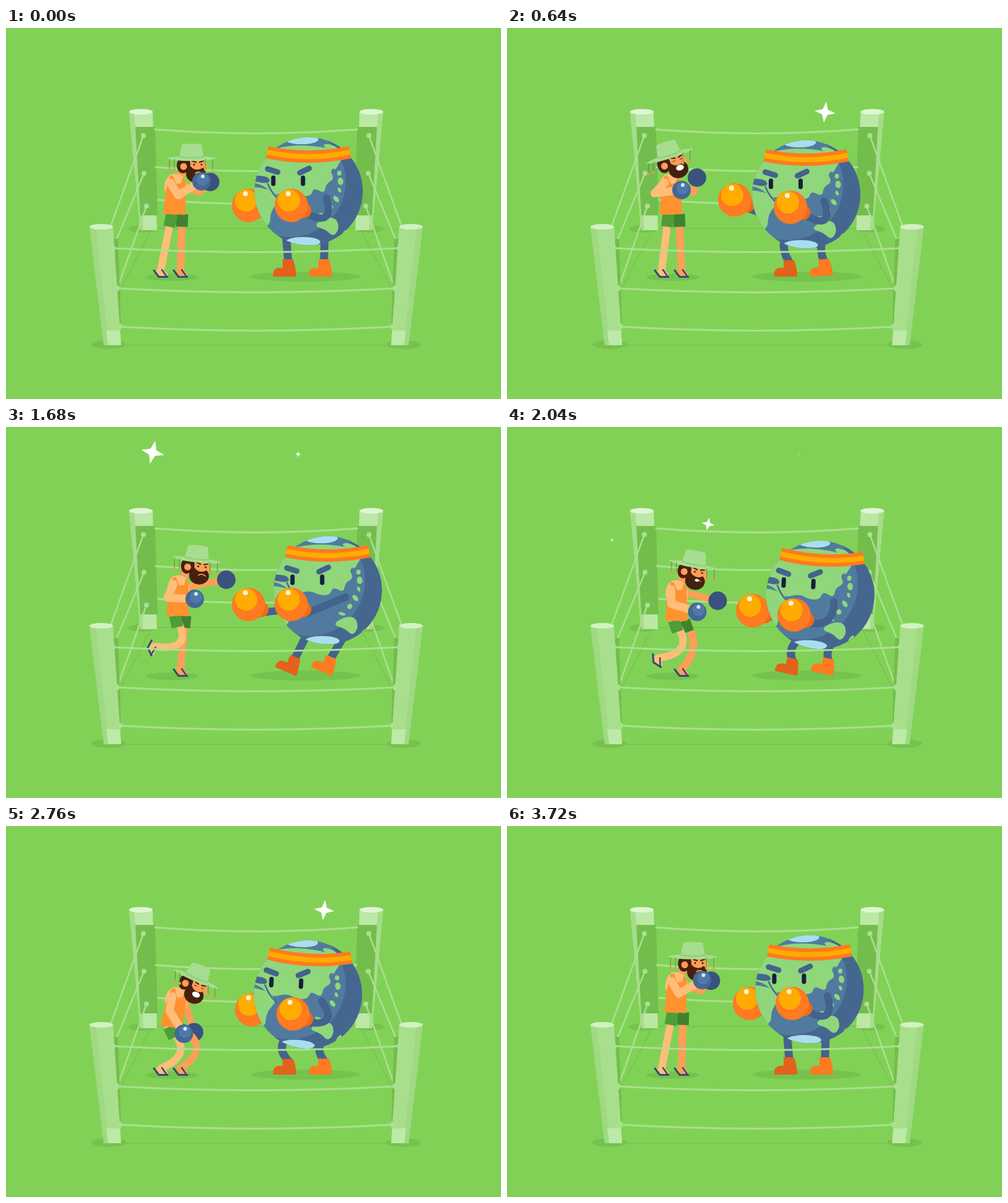
Animation, 800 px wide and 600 px high, one loop 3.76 s. Source, as an HTML page with a canvas:

```html
<!DOCTYPE html>
<html lang="en">
<head>
<meta charset="utf-8">
<title>Boxing match</title>
<style>
html, body { margin: 0; width: 100%; height: 100%; overflow: hidden; background: #82d157; }
canvas { display: block; width: 800px; height: 600px; }
</style>
</head>
<body>
<canvas id="stage" width="800" height="600"></canvas>
<script>
const ctx = document.getElementById('stage').getContext('2d');
const LOOP = 3760;
const TAU = Math.PI * 2;

// ---------- drawing helpers ----------
function ellipse(x, y, rx, ry, color, angle = 0) {
  ctx.fillStyle = color;
  ctx.beginPath();
  ctx.ellipse(x, y, rx, ry, angle, 0, TAU);
  ctx.fill();
}
const disc = (x, y, r, color) => ellipse(x, y, r, r, color);

function poly(points, color) {
  ctx.fillStyle = color;
  ctx.beginPath();
  points.forEach(p => ctx.lineTo(...p));
  ctx.fill();
}

// band between two edges, each given as [left, right, y]
function band([l1, r1, y1], [l2, r2, y2], color) {
  poly([[l1, y1], [r1, y1], [r2, y2], [l2, y2]], color);
}

// closed smooth shape guided by its corner points
function blob(points, color) {
  const mid = (a, b) => [(a[0] + b[0]) / 2, (a[1] + b[1]) / 2];
  ctx.fillStyle = color;
  ctx.beginPath();
  ctx.moveTo(...mid(points.at(-1), points[0]));
  points.forEach((p, i) => ctx.quadraticCurveTo(...p, ...mid(p, points[(i + 1) % points.length])));
  ctx.fill();
}

function line(points, width, color, cap = 'round') {
  ctx.strokeStyle = color;
  ctx.lineWidth = width;
  ctx.lineCap = cap;
  ctx.lineJoin = 'round';
  ctx.beginPath();
  points.forEach(p => ctx.lineTo(...p));
  ctx.stroke();
}

function curve(a, c, b, width, color, cap = 'round') {
  ctx.strokeStyle = color;
  ctx.lineWidth = width;
  ctx.lineCap = cap;
  ctx.beginPath();
  ctx.moveTo(...a);
  ctx.quadraticCurveTo(...c, ...b);
  ctx.stroke();
}

// curve that passes through its joint
const limb = (a, j, b, width, color) =>
  curve(a, [2 * j[0] - (a[0] + b[0]) / 2, 2 * j[1] - (a[1] + b[1]) / 2], b, width, color);

// elbow or knee of a two-bone limb; side picks the way it bends
function joint(a, b, upper, lower, side) {
  const dx = b[0] - a[0], dy = b[1] - a[1], d = Math.hypot(dx, dy);
  const along = d > upper + lower ? d * upper / (upper + lower)
    : (upper * upper - lower * lower + d * d) / (2 * d);
  const out = side * Math.sqrt(Math.max(0, upper * upper - along * along)) * (d < upper + lower);
  return [a[0] + (dx * along - dy * out) / d, a[1] + (dy * along + dx * out) / d];
}

function at(x, y, angle, draw) {
  ctx.save();
  ctx.translate(x, y);
  ctx.rotate(angle);
  draw();
  ctx.restore();
}

function bothSides(draw) {
  draw();
  ctx.save();
  ctx.translate(808.5, 0);
  ctx.scale(-1, 1);
  draw();
  ctx.restore();
}

const add = (p, x, y) => [p[0] + x, p[1] + y];

// ---------- motion ----------
const mix = (a, b, u) => {
  if (typeof a === 'number') return a + (b - a) * u;
  if (Array.isArray(a)) return a.map((v, i) => mix(v, b[i], u));
  return Object.fromEntries(Object.keys(a).map(k => [k, mix(a[k], b[k], u)]));
};

const BEATS = [0, 640, 1080, 1680, 2400, 3120, LOOP];

function poseAt(poses, t) {
  const i = BEATS.findIndex(beat => beat > t) - 1;
  const u = (t - BEATS[i]) / (BEATS[i + 1] - BEATS[i]);
  return mix(poses[i], poses[(i + 1) % poses.length], u * u * (3 - 2 * u));
}

// short recoil of the head when a punch lands
const recoil = t => [570, 1150].reduce((sum, hit) => sum + 7 * Math.exp(-(((t - hit) / 50) ** 2)), 0);

const manGuard = {
  head: [300, 211], nod: 0, hip: [272, 301], lean: .06,
  near: [316, 248], far: [330, 249], foot: [250, 392], kick: 0, pain: 0
};
const manHit = { ...manGuard, head: [264, 207], nod: -.31, hip: [265, 301], lean: 0,
  near: [282, 262], far: [307, 242], pain: 1 };
const manPoses = [
  manGuard,
  manHit,
  { ...manHit, head: [272, 209], nod: -.28, near: [281, 257], far: [318, 236] },
  { ...manGuard, head: [308, 215], nod: .12, hip: [277, 305],
    near: [305, 278], far: [356, 247], foot: [240, 355], kick: 1.15 },
  { ...manGuard, head: [295, 232], nod: .25, hip: [270, 321], lean: 0,
    near: [310, 320], far: [325, 315], pain: 1 },
  { ...manGuard, head: [319, 263], nod: .56, hip: [264, 329], lean: .4,
    near: [265, 352], far: [283, 352], pain: 1 }
];

const earthGuard = { pos: [489, 264], tilt: 0, turn: 0, front: [461, 287], rear: [392, 287] };
const earthPoses = [
  earthGuard,
  { ...earthGuard, pos: [483.5, 269], front: [458, 290], rear: [368, 278] },
  { ...earthGuard, pos: [472.5, 276], turn: -18, front: [345, 265], rear: [388, 271] },
  { ...earthGuard, pos: [520, 264] },
  { ...earthGuard, pos: [492.5, 279], tilt: .1, turn: -6, front: [467, 321], rear: [402, 307] },
  { ...earthGuard, pos: [483.5, 266] }
];

// x, y, size, time of the brightest moment
const stars = [
  [340, 83, 16, 360], [514, 136, 17, 650], [623, 193, 6, 905], [425, 152, 16, 1305],
  [237, 41, 19, 1690], [472, 44, 6, 1790], [325, 157, 16, 2195], [170, 183, 8, 2260],
  [514, 136, 17, 2710], [237, 41, 18, 3140]
];

function drawStars(t) {
  for (const [x, y, size, peak] of stars) {
    const phase = (t - peak) / 570;
    if (Math.abs(phase) >= .5) continue;
    const r = size * Math.cos(Math.PI * phase);
    const points = Array.from({ length: 8 }, (_, i) => {
      const d = i % 2 ? r * .36 : r;
      return [d * Math.sin(i * TAU / 8), -d * Math.cos(i * TAU / 8)];
    });
    at(x, y, (800 - x) / 2500, () => poly(points, '#fff'));
  }
}

// ---------- ring ----------
const ROPE = '#abe08f', SHADE = '#73bd4d', FLOOR = '#75c24e';
const backKnots = [[222, 174], [223, 235], [227, 288]];
const frontKnots = [[173, 356], [180, 421], [184, 483]];

const rope = (x, y) => curve([x, y], [404, y + 13], [808.5 - x, y], 3, ROPE);

function drawBackRing() {
  line([[220, 324], [588, 324]], 1.5, FLOOR);
  line([[165, 513], [643, 513]], 1.5, FLOOR);
  bothSides(() => {
    line([[234, 328], [184, 424], [183, 510]], 1.5, FLOOR);
    ellipse(221, 325, 24, 6, FLOOR);
    ellipse(166, 512, 28, 7, FLOOR);
    band([199, 237, 136], [217, 244, 327], '#bbe8a5');
    band([199, 207, 136], [217, 222, 327], '#a5dc89');
    band([209, 241, 160], [217, 245, 303], SHADE);
    ellipse(218, 135.5, 19, 4.5, '#dff6d2');
  });
  backKnots.forEach(([x, y]) => rope(x + 19, y - 10));
  bothSides(() => backKnots.forEach((knot, i) => {
    line([knot, i ? frontKnots[i - 1] : [170, 318]], 2.5, ROPE);
    disc(...knot, 4, ROPE);
  }));
  ellipse(268, 403, 43, 6, FLOOR);
  ellipse(484, 402, 88, 8, FLOOR);
}

function drawFrontRing() {
  bothSides(() => {
    band([173, 181, 341], [183, 186, 488], SHADE);
    band([135, 173, 322], [158, 186, 512], '#a8df8c');
    band([135, 145, 322], [158, 166, 513], '#9fd982');
    band([162, 184, 489], [165, 186, 513], '#bdeaa8');
    ellipse(154, 321.5, 19, 4.5, '#d3f1c3');
  });
  frontKnots.forEach(knot => rope(...knot));
  bothSides(() => frontKnots.forEach(knot => ellipse(...knot, 3.5, 5, ROPE)));
}

// ---------- globe ----------
const RADIUS = 87.5;
const LIMB = '#43628d', DEEP = '#45678f', LAND = '#90d67b', ICE = '#a9def0';
const ORANGE = '#ff7a20', AMBER = '#ffab00';

function bigGlove([x, y]) {
  disc(x + 20, y + 8, 12.5, '#f06a18');
  disc(x, y, 27, ORANGE);
  disc(x - 4, y - 8, 18, AMBER);
  disc(x - 5, y - 19, 4, '#fff4dc');
}

// tips back on the heel, or forward on the toe
function drawBoot(heelX, angle, squat, color, hip) {
  const pivot = angle < 0 ? -34 : 0, top = squat * .35 - 28;
  const c = Math.cos(angle), s = Math.sin(angle);
  const local = [-11 - pivot, top + 3];
  const ankle = [heelX + pivot + local[0] * c - local[1] * s, 402 + local[0] * s + local[1] * c];
  limb(hip, [(hip[0] + ankle[0] - squat) / 2 - squat * .3, (hip[1] + ankle[1]) / 2], ankle, 13, LIMB);
  at(heelX + pivot, 402, angle, () => {
    ctx.translate(-pivot, 0);
    ctx.fillStyle = color;
    ctx.beginPath();
    ctx.moveTo(-20, top);
    ctx.lineTo(-3, top);
    ctx.quadraticCurveTo(2, -14, 2, 0);
    ctx.lineTo(-35, 0);
    ctx.bezierCurveTo(-37, -15, -26, -15, -20, -14);
    ctx.fill();
  });
}

function drawSurface(turn) {
  disc(0, 0, RADIUS, '#507b9f');
  ctx.save();
  ctx.beginPath();
  ctx.arc(0, 0, RADIUS, 0, TAU);
  ctx.clip();
  ctx.fillStyle = DEEP;
  ctx.beginPath();
  ctx.rect(-90, -90, 180, 180);
  ctx.arc(-30, -16, 90, 0, TAU, true);
  ctx.fill('evenodd');

  ctx.translate(turn * 1.35, 0);
  ellipse(-11, -84, 27, 8, ICE);
  ellipse(-9, 82, 28, 8, ICE);
  blob([[-120, -50], [-40, -74], [10, -74], [56, -64], [50, -42], [34, -34], [42, -20],
    [28, -12], [26, 4], [8, -6], [4, 8], [-14, 8], [-30, 0], [-56, 8], [-74, -12], [-120, -18]], LAND);
  blob([[-120, -8], [-68, -6], [-44, 12], [-62, 32], [-62, 60], [-120, 70]], LAND);
  blob([[-92, -26], [-64, -24], [-62, -12], [-92, -16]], DEEP);
  curve([-66, -12], [-58, 6], [-48, 13], 2.5, DEEP);
  blob([[8, 56], [24, 44], [44, 42], [50, 60], [40, 74], [28, 62]], LAND);
  ellipse(36, -71, 12, 4, LAND, .3);
  ellipse(57, 70, 3, 8, LAND, .5);
  // island chain bending down the eastern sea
  for (let i = 0; i < 7; i++) {
    const a = -.75 + i * .24;
    ellipse(-4 + 66 * Math.cos(a) - i * 4, 60 * Math.sin(a), 2.5 + i % 3, 6 - i % 2 * 2, LAND, .5 - i * .3);
  }
  ctx.restore();
}

function drawFace(turn) {
  ctx.save();
  ctx.translate(turn, 0);
  line([[-66, -36], [-50, -31]], 9, LIMB);
  line([[-14, -30], [1, -37]], 9, LIMB);
  for (const x of [-57, -9]) line([[x, -22], [x, -12]], 7, '#14213a');
  ctx.restore();
  curve([-67, -63], [-1, -49], [67, -63], 20, ORANGE, 'butt');
  curve([-67, -63], [-1, -49], [67, -63], 8, AMBER, 'butt');
}

function drawEarth({ pos, tilt, turn, front, rear }) {
  const [x, y] = pos;
  const lean = (x - 489) * .013, squat = (y - 264) * .8, sway = tilt * 76;
  line([add(rear, 20, 13), add(pos, -70, 32)], 12, LIMB);
  bigGlove(rear);
  drawBoot(467, Math.max(0, lean), squat, '#e3611b', [x - 36 - sway, y + 76]);
  drawBoot(525, lean, squat, ORANGE, [x + 26 - sway, y + 74]);
  at(x, y, tilt, () => {
    drawSurface(turn);
    drawFace(turn);
  });
  const shoulder = add(pos, 29 + turn * 2.3, 11), hand = add(front, 26, 14);
  limb(shoulder, joint(shoulder, hand, 30, 30, -1), hand, 12, LIMB);
  bigGlove(front);
}

// ---------- man ----------
const SKIN = '#ffbd7a', TAN = '#ff9e57', HAIR = '#46200f', NAVY = '#344a75', FELT = '#a7dd90';

function drawLeg(start, foot, kick, skin, cloth) {
  const knee = joint(start, foot, 43, 43, -1);
  limb(start, knee, foot, 12, skin);
  at(...foot, kick, () => {
    ellipse(2, 5, 10, 5, skin, .35);
    line([[-11, 0], [-3, 10.5], [11, 10.5]], 3, NAVY);
    line([[2, -1], [9, 9]], 2.5, NAVY);
  });
  const hem = mix(start, knee, .45);
  line([start, hem], 19, cloth, 'butt');
}

function drawArm(shoulder, glove, upper, lower, width, color) {
  line([shoulder, joint(shoulder, glove, upper, lower, 1), glove], width, color);
}

function drawHead([x, y], nod, pain) {
  at(x, y, nod, () => {
    ellipse(-14, 11, 10, 13, HAIR);
    ellipse(6, 11, 16, 16, TAN);
    ellipse(21, 13, 4, 5, TAN);
    ellipse(7, 25, 16, 14, HAIR);
    ellipse(-6, 13, 4, 14, HAIR);
    ellipse(9, 10, 11, 8, TAN);
    disc(-13, 13, 5.5, TAN);
    for (const side of [-1, 1]) {
      const ex = 10 + side * 6;
      line([[ex - 3, 5 + side], [ex + 3, 5 - side]], 2.2, HAIR);
      ellipse(ex, 10, 1.5 + pain, 1.6 - pain, HAIR);
    }
    curve([6, 24], [11, 20], [17, 24], 1.8 * (1 - pain) + .1, TAN);
    ellipse(10, 23, 6.5 * pain, 4.5 * pain, '#fff');
    band([-16, 16, -22], [-20, 20, 0], FELT);
    ellipse(0, -22, 16, 2, FELT);
    ellipse(0, 0, 39, 4, FELT);
    curve([-20, -3], [0, 1], [20, -3], 2, '#8fcc78');
    for (const cx of [-36, -28, 22, 34]) {
      at(cx, 1, -nod, () => {
        line([[0, 0], [0, 15]], 1, '#58913f');
        ellipse(0, 17, 2, 2.5, '#e69b4f');
      });
    }
  });
}

function drawTorso(hip, lean) {
  at(...hip, lean, () => {
    line([[4, -60], [9, -69]], 13, TAN);
    blob([[-20, -50], [-10, -66], [10, -64], [18, -48], [17, -28], [-17, -28]], SKIN);
    poly([[-11, -61], [-6, -62], [0, -49], [8, -50], [10, -61], [15, -54], [18, 0], [-18, 1], [-16, -36]], '#ff922e');
  });
}

function drawMan(m, t) {
  const shoulder = add(m.hip, 61 * Math.sin(m.lean), -61 * Math.cos(m.lean));
  drawArm(add(shoulder, 9, 15), m.far, 30, 24, 11, TAN);
  disc(...m.far, 15, '#3a527e');
  drawLeg(add(m.hip, 13, 0), [282, 392], 0, TAN, '#3f8330');
  drawLeg(add(m.hip, -4, 0), m.foot, m.kick, SKIN, '#4f9c38');
  drawTorso(m.hip, m.lean);
  drawHead(add(m.head, -recoil(t), 0), m.nod, m.pain);
  drawArm(add(shoulder, -10, 10), m.near, 24, 44, 13, SKIN);
  disc(...m.near, 15, '#446895');
  disc(m.near[0] + 2, m.near[1] - 3, 10, '#5079a8');
  disc(m.near[0] + 2, m.near[1] - 8, 3, '#d7e8f6');
}

// ---------- loop ----------
function render(now) {
  const t = now % LOOP;
  ctx.fillStyle = '#82d157';
  ctx.fillRect(0, 0, 800, 600);
  drawBackRing();
  drawStars(t);
  drawEarth(poseAt(earthPoses, t));
  drawMan(poseAt(manPoses, t), t);
  drawFrontRing();
}

let begin;
function frame(now) {
  begin ??= now;
  render(Math.max(0, now - begin));
  requestAnimationFrame(frame);
}
render(0);
requestAnimationFrame(frame);
</script>
</body>
</html>
```
